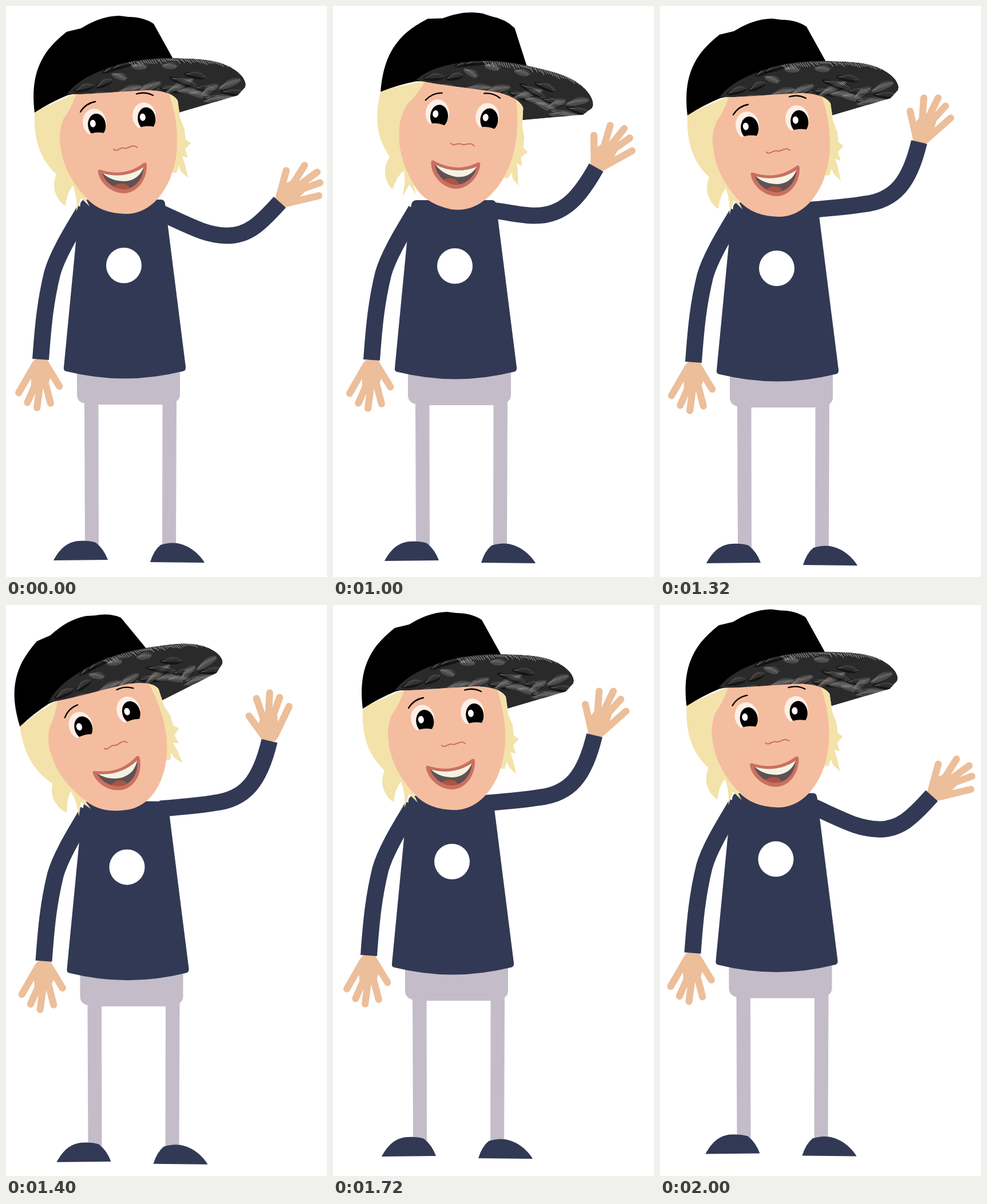
Animation, 561 px wide and 997 px high, one loop 2200 ms. Source, as an HTML page with a canvas:

```html
<!DOCTYPE html>
<html lang="en">
<head>
<meta charset="utf-8">
<title>Waving kid</title>
<style>
  html, body { margin: 0; width: 100%; height: 100%; overflow: hidden; background: #fff; }
  canvas { display: block; width: 100vw; height: 100vh; }
</style>
</head>
<body>
<canvas id="stage"></canvas>
<script>
const W = 561, H = 997, LOOP = 2200;
const NAVY = '#323955', PANTS = '#c4bcc8', HAND = '#ecbe99', SKIN = '#f4bd9f';
const HAIR = '#f3e2a9', LIP = '#cb6f61', BLACK = '#000';

const canvas = document.getElementById('stage');
const ctx = canvas.getContext('2d');
const rad = deg => deg * Math.PI / 180;

// Waving arm: sleeve centre line, wrist position and hand angle
const arms = {
  low:  { path: 'M268 360C330 388 350 400 385 401C422 402 444 381 478.5 342.5', wrist: [478.5, 342.5], turn: 28 },
  mid:  { path: 'M263 355C293 357 318 365 345 365C398 366 426 329 453 281', wrist: [453, 281], turn: 12.5 },
  high: { path: 'M264 351C300 348 335 345 358 341C412 335 438 304 455 232.5', wrist: [455, 232.5], turn: 0 }
};

// Each pose holds until the next one; head is relative to the body
const poses = [
  { at: 0,    x: 0,    y: 0,    arm: arms.low },
  { at: 1000, x: 7,    y: 1,    arm: arms.mid, head: { x: 10.8, y: -7.5, tilt: 11.3 } },
  { at: 1200, x: -2,   y: 5,    arm: arms.high },
  { at: 1400, x: 5.5,  y: 4.7,  arm: arms.high, twist: -23, head: { x: -22.5, y: -8.2, tilt: -10.4 } },
  { at: 1600, x: 2,    y: -5,   arm: arms.high },
  { at: 1800, x: 3,    y: -1.4, arm: arms.mid },
  { at: 2000, x: -3.5, y: -9.4, arm: arms.low }
];

function fill(d, color) {
  ctx.fillStyle = color;
  ctx.fill(new Path2D(d));
}

function line(d, color, width, cap = 'round') {
  ctx.strokeStyle = color;
  ctx.lineWidth = width;
  ctx.lineCap = cap;
  ctx.stroke(new Path2D(d));
}

function oval(x, y, rx, ry, color, turn = 0) {
  ctx.fillStyle = color;
  ctx.beginPath();
  ctx.ellipse(x, y, rx, ry, turn, 0, 7);
  ctx.fill();
}

function placed(x, y, deg, draw) {
  ctx.save();
  ctx.translate(x, y);
  ctx.rotate(rad(deg));
  draw();
  ctx.restore();
}

function hand(x, y, deg) {
  placed(x, y, deg, () => {
    fill('M-10 3L-12-12L-13-26L-1-41L15-47L23-43L30-36L22-9L11 4Z', HAND);
    line('M-5-6L-16-54M5-34L8-77M12-34L33-77M16-30L46-63M12-4L55-42', HAND, 12.2);
  });
}

function random(seed) {
  return () => (seed = seed * 16807 % 2147483647) / 2147483647;
}

function legs() {
  fill('M124 625H304V680Q303 687 298 690L297 945H273L273.5 696H161.5L162 945H138L137 694Q124 691 124 678Z', PANTS);
  fill('M83 968C93 949 107 935 128 934Q145 933 157 937Q171 948 178 967Z', NAVY);
  fill('M252 971Q258 951 270 941Q285 936 299 938C318 941 337 955 347 972Z', NAVY);
}

function torso() {
  line('M138 355C124 380 92 428 81 466C69 515 65 555 60.5 617', NAVY, 29, 'butt');
  fill('M139 338H271Q277 338 278 345L314 630Q315 637 308 638Q207 663 106 638Q100 637 101 631L122 413L130 345Q132 338 139 338Z', NAVY);
  oval(206, 453, 31, 31, '#fff');
}

function hair() {
  fill('M50 184Q49 208 52 225Q58 266 88 294Q82 309 85 322Q91 342 104 349Q106 327 117 313Q125 334 123 359Q128 345 131 335L146 350L138 333L160 300L150 140Z', HAIR);
  fill('M280 145L301 165L304 195L312 215L314 233L323 239L313 250L318 265L308 262L313 277L318 300L306 289L302 279L298 291L286 290Z', HAIR);
}

function eye(x, y) {
  placed(x, y, -7, () => {
    oval(-3, -3, 20.5, 24, '#fdefe7');
    oval(0.5, 2, 15.5, 20, BLACK);
    oval(-6, -1.5, 5, 6.5, '#fff');
    oval(0, 28.5, 25, 13.5, SKIN, 0.12);
  });
}

function mouth() {
  fill('M161 291Q159 283 168 287Q208 298 238 276Q246 270 246 279C246 305 228 327 206 327C185 327 165 310 161 291Z', LIP);
  const inner = 'M168 292Q208 303 241 281C240 303 224 320 206 320C188 320 172 306 168 292Z';
  ctx.save();
  ctx.clip(new Path2D(inner));
  fill(inner, '#605254');
  oval(201, 320, 15, 10, '#a95644', -0.1);
  fill('M168 291Q208 303 241 281Q232 304 208 306Q183 306 168 291Z', '#f4f3e2');
  ctx.restore();
}

function face() {
  fill('M124 150Q114 180 100 198Q91 222 95 243C99 282 119 311 140 335Q164 362 209 363C249 363 273 333 287 301Q300 268 299 232C299 205 293 174 282 145Z', SKIN);
  eye(158, 206);
  eye(245, 195);
  line('M130 185Q139 170 156 167M228 153.5Q243 149 257 156', BLACK, 2.3);
  line('M188 250C193 256 200 246 206 248C212 252 220 239 229 247', LIP, 2);
  mouth();
}

// Pale leaf fronds scattered over a dark brim
function brim() {
  const shape = 'M106 154C125 130 150 118 185 106C230 92 260 90 297 91C340 92 365 94 385 103C405 112 418 125 419 137L418 142L405 156L303 186L300 165C292 152 270 147 245 147C200 149 150 155 106 154Z';
  ctx.save();
  ctx.clip(new Path2D(shape));
  fill(shape, '#2b2a2a');
  const rnd = random(77);
  for (let i = 0; i < 34; i++) {
    const x = 118 + i * 8.8, y = 96 + rnd() * 78, len = 22 + rnd() * 26;
    placed(x, y, -28 + rnd() * 50, () => {
      oval(0, 0, len * 0.6, 5, i % 2 ? 'rgba(125,124,122,.4)' : 'rgba(8,8,8,.6)');
      for (let k = 0; k < len; k += 3) {
        const s = 8 * Math.sin(Math.PI * (k + 3) / (len + 6));
        line(`M${k - len / 2} 0l5 ${-s}`, 'rgba(190,188,184,.5)', 0.9);
      }
    });
  }
  for (let x = 215; x < 400; x += 4) {
    const top = 92 + ((x - 297) / 32) ** 2;
    line(`M${x} ${top}l5 ${3 + rnd() * 6}`, 'rgba(220,218,210,.55)', 1.2);
  }
  ctx.restore();
}

function head() {
  hair();
  face();
  fill('M50 186C45 142 50 108 74 76Q87 60 106 45L131 39C158 23 175 18 198 17L214 19Q240 19 258 31L293 94L250 125L107 156Q78 168 50 186Z', BLACK);
  brim();
}

function draw(pose) {
  const { arm, twist = 0, head: h = { x: 0, y: 0, tilt: 0 } } = pose;
  placed(pose.x, pose.y, 0, () => {
    legs();
    hand(61, 618, 161.5);
    hand(...arm.wrist, arm.turn + twist);
    torso();
    line(arm.path, NAVY, 28.5, 'butt');
    placed(208.5 + h.x, 248.5 + h.y, h.tilt, () => {
      ctx.translate(-208.5, -248.5);
      head();
    });
  });
}

function frame(now) {
  const t = now % LOOP;
  const w = Math.round(innerWidth * devicePixelRatio);
  const h = Math.round(innerHeight * devicePixelRatio);
  if (canvas.width !== w || canvas.height !== h) {
    canvas.width = w;
    canvas.height = h;
  }
  ctx.setTransform(w / W, 0, 0, h / H, 0, 0);
  ctx.fillStyle = '#fff';
  ctx.fillRect(0, 0, W, H);
  draw(poses.findLast(p => p.at <= t) || poses[0]);
  requestAnimationFrame(frame);
}

frame(0);
</script>
</body>
</html>
```
